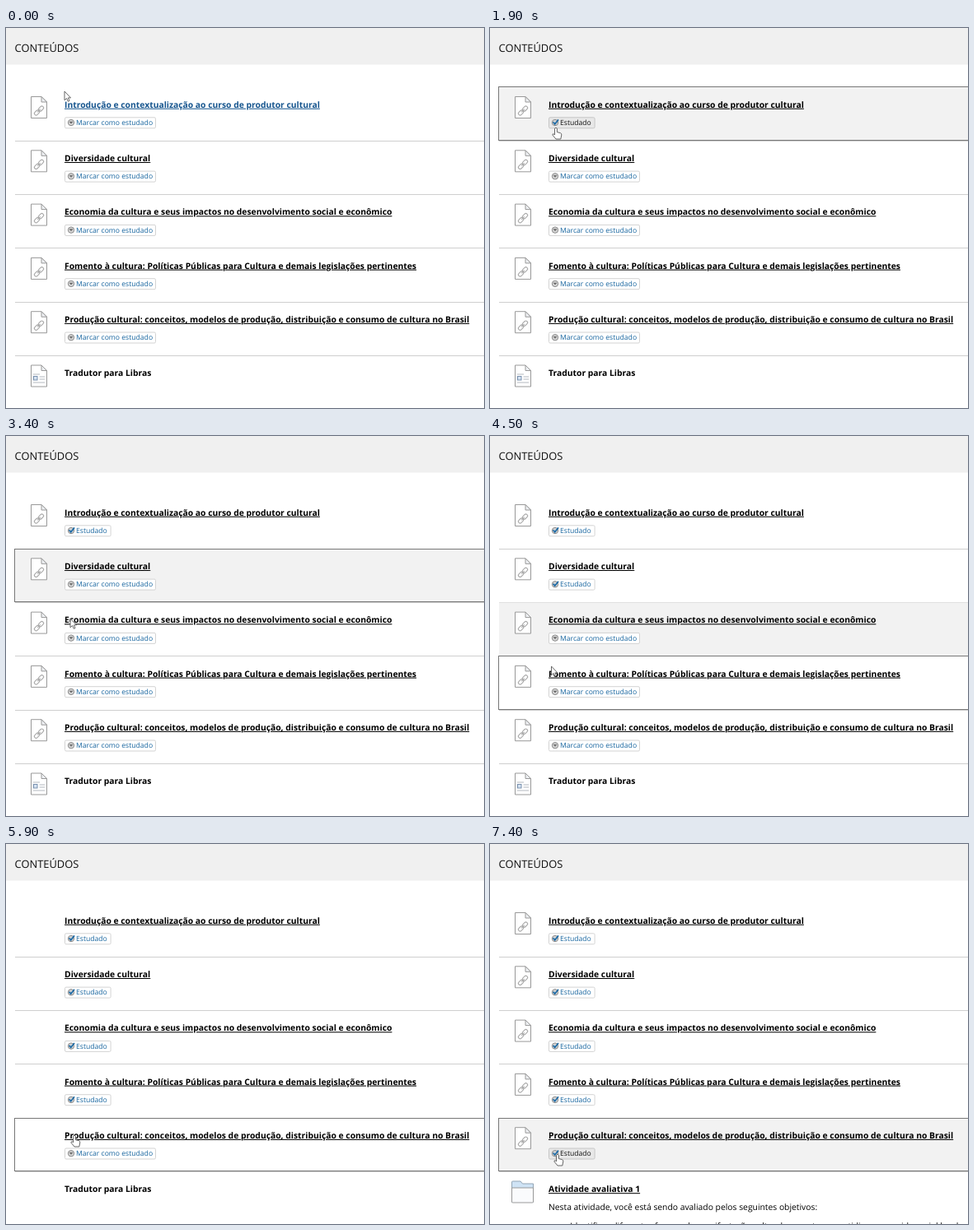
Animation, 580 px wide and 462 px high, one loop 8 s. Source, as an HTML page:

```html
<!DOCTYPE html>
<html lang="pt-BR">
<head>
<meta charset="utf-8">
<title>Conteúdos</title>
<style>
html, body { margin: 0; width: 100%; height: 100%; overflow: hidden; background: #fff; }
svg { display: block; width: 580px; height: 462px; }
text { font-family: "Open Sans", sans-serif; text-rendering: geometricPrecision; font-size: 10.33px; fill: #000; }
.head { font-size: 12.86px; fill: #111; }
.title { font-weight: 700; }
.link { text-decoration: underline; }
.visited { fill: #17568f; }
.label { font-size: 8.62px; fill: #17659f; }
.hot { fill: #111; }
.doc { fill: #fff; stroke: #999; stroke-width: 1; stroke-linejoin: round; }
.chain { fill: none; stroke: #aaa; stroke-width: 1.1; }
.cursor { fill: #fff; stroke: #555; stroke-width: .9; stroke-linejoin: round; }
</style>
</head>
<body>
<svg id="stage" viewBox="0 0 580 462"></svg>
<script>
const LOOP = 8000, STEP = 100, TOP = 71.45, PITCH = 65.3;
const titles = [
  'Introdução e contextualização ao curso de produtor cultural',
  'Diversidade cultural',
  'Economia da cultura e seus impactos no desenvolvimento social e econômico',
  'Fomento à cultura: Políticas Públicas para Cultura e demais legislações pertinentes',
  'Produção cultural: conceitos, modelos de produção, distribuição e consumo de cultura no Brasil'
];
const focusAt = [100, 2200, 3500, 4500, 5800];
const doneAt = [1300, 3500, 4700, 5800, 7200];
const RELOAD = 200;

// time, x, y of the pointer tip
const path = [
  [0, 71, 77], [100, 74, 95], [300, 79, 122], [400, 79, 122], [600, 80, 117],
  [1200, 80, 117], [1500, 80, 121], [1900, 80, 121], [2600, 81, 183],
  [2900, 81, 183], [3400, 78, 222], [3800, 84, 252], [4100, 78, 247],
  [4300, 78, 247], [4500, 74.5, 280], [5100, 79, 311], [5300, 79, 311],
  [5400, 79, 312], [5600, 79, 312], [5900, 83, 354], [6500, 82, 377], [8000, 82, 377]
];

const edge = i => Math.round(TOP + PITCH * i) + .5;

function pointer(t) {
  const k = Math.max(1, path.findIndex(p => p[0] >= t));
  const [t0, x0, y0] = path[k - 1], [t1, x1, y1] = path[k];
  const u = (t - t0) / (t1 - t0);
  const x = x0 + (x1 - x0) * u, y = y0 + (y1 - y0) * u;
  const row = Math.floor((y - TOP) / PITCH), local = y - TOP - row * PITCH;
  const onButton = local >= 37 && local <= 52;
  return { x, y, row, onButton, hand: onButton || (local >= 21 && local <= 30) };
}

const text = (x, y, cls, s) => `<text x="${x}" y="${y}" class="${cls}">${s}</text>`;

function sheet(inner) {
  return `<path class="doc" d="M30.5 83.5H43L49.5 90V109.5H30.5Z"/>
    <path class="doc" style="fill:#eef0f3" d="M43 83.5V90H49.5Z"/>${inner}`;
}

const chain = `<g class="chain" transform="translate(40 100.5) rotate(-45)">
  <rect x="-7" y="-2.1" width="7" height="4.2" rx="2.1"/>
  <rect x="0" y="-2.1" width="7" height="4.2" rx="2.1"/><path d="M-2.5 0H2.5"/></g>`;

const article = `<path d="M33 94.5H41M40.5 97.5H47M40.5 100.5H47M33 104.5H47" stroke="#b3b8bf" fill="none"/>
  <rect x="33.5" y="97" width="4.5" height="4.5" fill="#d6e3f2" stroke="#7890ad"/>`;

const folder = `<path d="M26.5 109V84.5Q26.5 83.5 27.5 83.5H37L39.5 86.5H52.5V109Z" fill="#cfe3f5" stroke="#93a5b5"/>
  <path d="M26.5 91.5H52.5V108.5Q52.5 109.5 51.5 109.5H27.5Q26.5 109.5 26.5 108.5Z" fill="#fafbfd" stroke="#999"/>`;

function button(done, hot) {
  const mark = done
    ? '<path d="M76.6 114.3L78.7 116.8L83 111.4" fill="none" stroke="#1d6aa5" stroke-width="1.7"/>'
    : '<path d="M77 114L79 116.2L81 114Z" fill="#666" stroke="#666" stroke-width=".5"/>';
  return `<rect x="71.5" y="108.8" width="${done ? 55.6 : 110}" height="13" rx="1.5"
      fill="${hot ? '#e8e8e8' : '#fff'}" stroke="${hot ? '#c6c6c6' : '#d3d3d3'}"/>
    <circle cx="79" cy="115" r="3.7" fill="#d6d6d6" stroke="#808080" stroke-width=".9"/>${mark}` +
    text(85, 118.1, hot ? 'label hot' : 'label', done ? 'Estudado' : 'Marcar como estudado');
}

function cursor(p) {
  const d = p.hand
    ? 'M-1.5 1.2Q0 -.8 1.4 1.2V5.6L5.4 6.6Q7 7.1 6.8 9L5.8 14H0L-4 9.2Q-4.3 7.4 -2.7 7.8L-1.5 9Z'
    : 'M0 0V10.8L2.6 8.5L4.3 12.3L6 11.5L4.4 7.9H7.5Z';
  return `<path class="cursor" transform="translate(${p.x} ${p.y})" d="${d}"/>`;
}

function draw(t) {
  const p = pointer(t);
  const icons = !doneAt.some(d => t >= d && t < d + RELOAD);
  const last = t >= doneAt[4];
  let back = '', rows = '', frame = '';

  titles.forEach((title, i) => {
    const y = edge(i), h = edge(i + 1) - y, next = focusAt[i + 1] ?? LOOP;
    if (t >= focusAt[i] + 200 && t < next + STEP)
      back += `<rect x="11" y="${y}" width="580" height="${h}" fill="#f2f2f2"/>`;
    back += `<path d="M11 ${y + h}H580" stroke="#cfcfcf"/>`;
    if (t >= focusAt[i] && t < next)
      frame = `<rect x="10.5" y="${y}" width="580" height="${h - 1}" fill="none" stroke="#777"/>`;
    rows += `<g transform="translate(0 ${PITCH * i})">` + (icons ? sheet(chain) : '') +
      text(71, 96.7, 'title link' + (!i && t < 800 ? ' visited' : ''), title) +
      button(t >= doneAt[i], p.onButton && p.row === i) + '</g>';
  });

  rows += `<g transform="translate(0 ${PITCH * 5})">` +
    (icons ? (last ? folder : sheet(article)) : '') +
    (last
      ? text(71, 96.7, 'title link', 'Atividade avaliativa 1') +
        text(71, 118.8, '', 'Nesta atividade, você está sendo avaliado pelos seguintes objetivos:') +
        text(97, 141.6, '', 'Identificar diferentes formas de manifestação cultural presentes no cotidiano e na vida social local;')
      : text(71, 96.7, 'title', 'Tradutor para Libras')) + '</g>';

  stage.innerHTML = '<rect width="580" height="462" fill="#fff"/><rect width="580" height="44.5" fill="#f0f0f0"/>' +
    text(10.6, 28.8, 'head', 'CONTEÚDOS') + back + frame + rows + cursor(p);
}

const stage = document.getElementById('stage');
let shown = -1;
function tick() {
  const t = Math.floor(performance.now() % LOOP / STEP) * STEP;
  if (t !== shown) draw(shown = t);
  requestAnimationFrame(tick);
}
tick();
</script>
</body>
</html>
```
